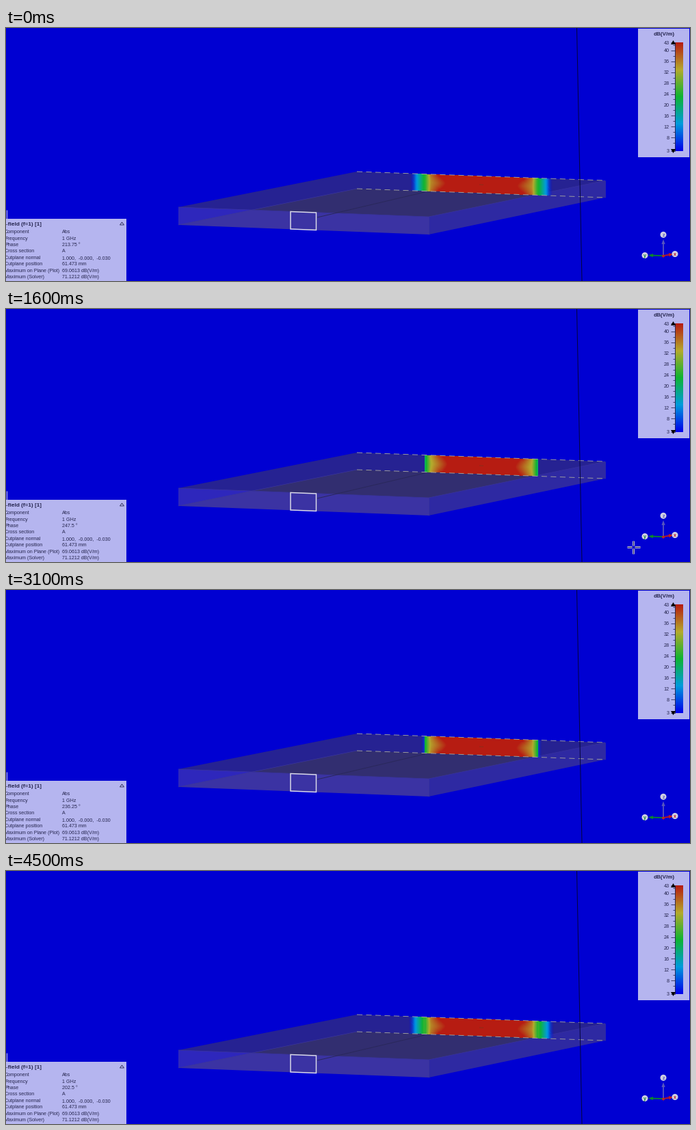
Recreate the animation shown at these times as a matplotlib script. Size 1000x370 px, loop 4.6 s.

```python
import numpy as np
import matplotlib.pyplot as plt
from matplotlib.animation import FuncAnimation
from matplotlib.colors import LinearSegmentedColormap, ListedColormap
from matplotlib.patches import Circle, Polygon, Rectangle

W, H, DPI = 1000, 370, 100
FRAMES, STEP = 46, 100
PX = 72 / DPI
INK = "#26264f"
LO, HI = 3, 43

plt.rcParams["font.family"] = "Liberation Sans"
fig = plt.figure(figsize=(W / DPI, H / DPI), dpi=DPI)
fig.patch.set_facecolor("#0000d2")
ax = fig.add_axes([0, 0, 1, 1])
ax.axis("off")


def rgb(r, g, b):
    return r / 255, g / 255, b / 255


def poly(points, color, z=1):
    return ax.add_patch(Polygon(points, fc=color, lw=0, zorder=z))


def outline(points, color, width, z=4):
    ax.add_patch(Polygon(points, fc="none", ec=color, lw=width * PX, zorder=z))


def line(xs, ys, color, width=1, z=4, **kw):
    return ax.plot(xs, ys, color=color, lw=width * PX, zorder=z,
                   solid_capstyle="butt", **kw)[0]


def join(p, q, color, width=.7, z=2):
    return line(*zip(p, q), color, width, z)


def label(x, y, s, size=7.1, color=INK, ha="left", weight="normal"):
    return ax.text(x, y, s, fontsize=size * PX, color=color, ha=ha,
                   va="center_baseline", weight=weight, zorder=6)


def panel(x, y, w, h):
    ax.add_patch(Rectangle((x, y), w, h, fc=rgb(181, 181, 239), lw=0, zorder=5))


rainbow = LinearSegmentedColormap.from_list("rainbow", [
    rgb(0, 0, 235), rgb(0, 155, 220), rgb(15, 180, 50),
    rgb(180, 170, 45), rgb(182, 28, 18)])
level = np.linspace(0, 1, 256)
faded = rainbow(level)
faded[:, 3] = np.clip(level / .2, 0, 1)

# Slab: top face corners, then the same corners on the bottom face
A, B, C, D = (252, 262), (513, 210), (876, 223), (618, 276)
A2, B2, C2, D2 = (252, 288), (513, 235), (876, 248), (618, 302)
poly([A, B, C, D], rgb(38, 34, 146))
poly([A, A2, D2, D], rgb(59, 51, 163))
poly([A, A2, (360, 266)], rgb(46, 39, 188), 1.1)
poly([D, C, C2, D2], rgb(46, 41, 162))
floor = poly([A2, B2, C2, D2], rgb(50, 46, 112), 1.2)
floor.set_clip_path(Polygon([A, B, C, D], transform=ax.transData))
for p, q in [(A, D), (D, D2), (D, C), (A2, B2), (C, C2)]:
    join(p, q, rgb(60, 54, 155))
join((455, 277), (612, 240), rgb(42, 40, 92), 1)

# Field strip on the back face
CENTER, REACH = 695, 112


def back_y(x, v):
    return B[1] + (x - B[0]) * 13 / 363 + 25 * (v + 1) / 2


xs = np.arange(CENTER - REACH, CENTER + REACH + 1)
vs = np.linspace(-1, 1, 27)
X, V = np.meshgrid(xs, vs)
U, VC = np.meshgrid(np.abs(xs[:-1] + .5 - CENTER), (vs[1:] + vs[:-1]) / 2)


def field(phase):
    """Level in dB over the strip: saturated core, sloped sides, faint tail."""
    g = abs(np.cos(np.radians(phase - 22.5)))
    core = 30 + 22 * g ** .4
    edge = 76 + 7 * min(1, 2.5 * g)
    slope = .35 + .55 * (1 - g) ** 1.5
    bend = 14 * np.tanh(5 * (g - .55))
    u = U - bend * np.abs(VC) ** 1.5 * np.clip((82 - U) / 20, 0, 1)
    inner = HI + slope * (core - u) - np.clip(U - 74, 0, 8)
    tail = 26 * max(0, (g - .75) / .25) - (U - edge)
    return np.clip(np.where(U < edge, np.maximum(inner, 14), tail), LO, HI)


mesh = ax.pcolormesh(X, back_y(X, V), field(0), cmap=ListedColormap(faded),
                     vmin=LO, vmax=HI, zorder=3)
for v in (-1, 1):
    ends = np.array([B[0], C[0]])
    line(ends, back_y(ends, v), rgb(165, 165, 160), .9, ls=(0, (9, 6)))
join((692, 229), (698, 229.3), rgb(140, 45, 25), 1, 4)

join((834.5, 0), (842, 370), rgb(5, 5, 60), 1, 4)
outline([(416, 268.5), (453.5, 270), (453.5, 295.5), (416, 294)],
        rgb(218, 218, 232), 1.5)

# Colour scale
TOP, BOTTOM = 21, 180
panel(924, 1, 74.5, 187.5)
label(962, 8.5, "dB(V/m)", 8.2, ha="center", weight="bold")
ax.imshow(level[::-1, None], cmap=rainbow, extent=(978, 990, BOTTOM, TOP),
          aspect="auto", zorder=6)
join((978, TOP), (978, BOTTOM), INK, .9, 7)


def tick(val, size):
    y = TOP + (HI - val) * (BOTTOM - TOP) / (HI - LO)
    join((978 - size, y), (978, y), INK, .8, 7)
    return y


for val in [HI, *range(40, 7, -4), LO]:
    label(970, tick(val, 6), str(val), 7.3, ha="right")
for val in range(6, HI, 4):
    tick(val, 3)
for y, up in ((TOP, -3), (BOTTOM, 3)):
    poly([(972, y - up), (979, y - up), (975.5, y + up)], "black", 8)

# Info panel
panel(0, 279, 176, 91)
join((.5, 266), (.5, 279), rgb(200, 200, 240), 1, 5)
label(0, 286.5, "-field (f=1) [1]", 8.2, weight="bold")
outline([(166.5, 288), (172.5, 288), (169.5, 284)], INK, .8, 6)
rows = {"Component": "Abs", "Frequency": "1 GHz", "Phase": "",
        "Cross section": "A", "Cutplane normal": "1.000,  -0.000,  -0.030",
        "Cutplane position": "61.473 mm",
        "Maximum on Plane (Plot)": "69.0613 dB(V/m)",
        "Maximum (Solver)": "71.1212 dB(V/m)"}
cells = {}
for i, (name, val) in enumerate(rows.items()):
    y = 297.7 + 9.4 * i
    label(-2, y, name)
    cells[name] = label(82, y, val)


# Axis triad
def axis(tip, badge, name, color):
    start, tip = np.array([961, 333]), np.array(tip)
    d = (tip - start) / np.hypot(*(tip - start))
    n = np.array([-d[1], d[0]])
    join(start, tip, color, 1.8, 4)
    poly([tip + 3 * d, tip - 4 * d + 2.6 * n, tip - 4 * d - 2.6 * n], color, 5)
    ax.add_patch(Circle(badge, 4.5, fc=rgb(208, 208, 226), lw=0, zorder=5))
    label(*badge, name, 7.2, color, ha="center", weight="bold")


axis((961, 312), (961, 302.3), "z", rgb(85, 85, 190))
axis((942, 332.5), (934, 332.5), "y", rgb(10, 135, 45))
axis((973, 331), (978, 330.5), "x", rgb(190, 25, 35))
ax.add_patch(Circle((961, 333.5), 2, fc=rgb(190, 40, 30), lw=0, zorder=6))

# Hollow cross-hair: pale arms with a dark core
arm_x = np.array([-9.5, -2, np.nan, 2, 9.5, np.nan, 0, 0, np.nan, 0, 0])
arm_y = np.array([0, 0, np.nan, 0, 0, np.nan, -9.5, -2, np.nan, 2, 9.5])
cursor = [line(arm_x, arm_y, rgb(205, 205, 220), 3, 9),
          line(arm_x, arm_y, rgb(20, 20, 110), 1, 9)]

ax.set_xlim(0, W)
ax.set_ylim(H, 0)

# Uneven playback: count of 11.25 degree steps reached at a few moments
KEY_TIMES = [0, 8, 16, 25, 31, 35, 45]
KEY_STEPS = [19, 36, 54, 73, 85, 92, 114]


def update(n):
    phase = int(np.interp(n, KEY_TIMES, KEY_STEPS) + 1e-6) % 32 * 11.25
    mesh.set_array(field(phase))
    cells["Phase"].set_text(f"{phase:g} °")
    p = np.clip((n - 8) / 8, 0, 1)
    for part in cursor:
        part.set_data(948 - 31 * p + arm_x, 357 - 9 * p + arm_y)
        part.set_visible(6 <= n <= 19)
    return [mesh, cells["Phase"], *cursor]


anim = FuncAnimation(fig, update, frames=FRAMES, interval=STEP, repeat=True,
                     repeat_delay=0, blit=False)
plt.show()
```
